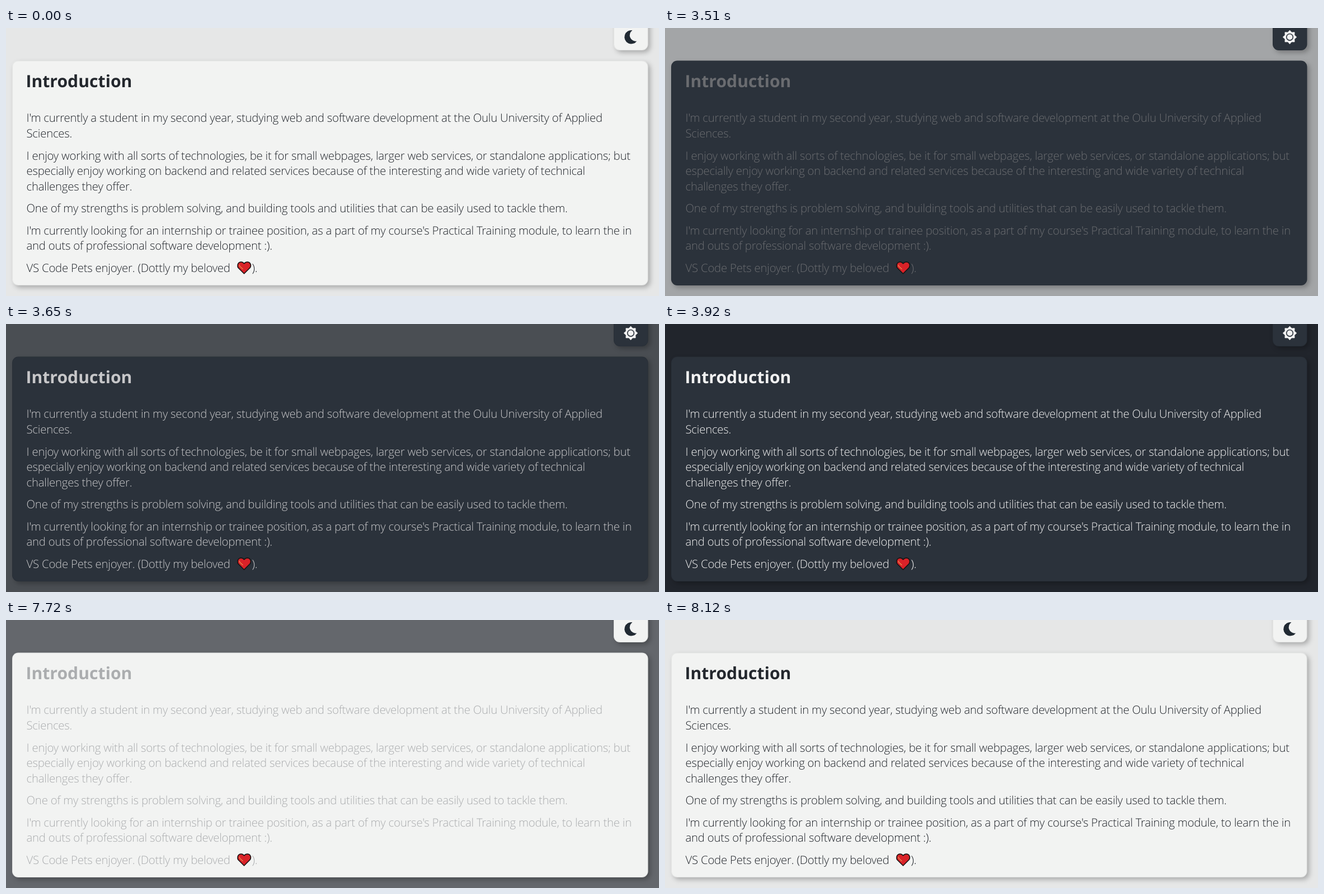
Recreate the animation shown at these times as an HTML page. Size 1167 px wide and 480 px high, loop 8.26 s.

```html
<!DOCTYPE html>
<html lang="en">
<head>
<meta charset="utf-8">
<title>Theme switch</title>
<style>
  html, body { margin: 0; width: 100%; height: 100%; overflow: hidden; }
  svg { display: block; }
  .panel { filter: drop-shadow(4px 4px 4px rgba(0, 0, 0, .26)); }
  .edge { fill: none; stroke: rgba(0, 0, 0, .06); }
  text {
    font: 300 20.4px "Open Sans", "Noto Sans", sans-serif;
    letter-spacing: -.24px;
    text-rendering: geometricPrecision;
    white-space: pre;
  }
  .title { font-size: 30.2px; font-weight: 700; letter-spacing: 0; }
</style>
</head>
<body>
<svg width="1167" height="480" viewBox="0 0 1167 480">
  <g id="panels">
    <rect class="panel" x="1086" y="-20" width="61.5" height="60" rx="11"/>
    <rect class="panel" x="11" y="58.5" width="1136.5" height="402.5" rx="11"/>
  </g>
  <rect class="edge" x="1086.5" y="-20" width="60.5" height="59.5" rx="10.5"/>
  <rect class="edge" x="11.5" y="59" width="1135.5" height="401.5" rx="10.5"/>

  <path id="moon" fill="#212a33" d="M1119.4 4.2A12.2 12.2 0 1 0 1127.4 23.4A10.6 10.6 0 0 1 1119.4 4.2Z"/>
  <g id="sun" fill="#f2f2f2">
    <polygon id="rays" stroke="#f2f2f2" stroke-width="1.4" stroke-linejoin="round"/>
    <circle cx="1116.5" cy="16.3" r="5.8" stroke="#2b323b" stroke-width="1.6"/>
  </g>

  <g id="copy"><text class="title" x="35.4" y="106">Introduction</text></g>

  <path fill="#d92228" stroke="#171313" stroke-width="1.6" stroke-linejoin="round"
    d="M425.5 440L415 429.5Q413.6 427.5 414 424.5Q415 419.3 420 419Q423.5 419 425.5 422Q428 419 431.5 419Q436.6 419.5 437.4 424.5Q437.6 427.5 436 429.5Z"/>
  <path fill="none" stroke="#e5904f" stroke-width="1.2" d="M417.5 424V426.5L423.5 432"/>
</svg>
<script>
const $ = id => document.getElementById(id);
const LOOP = 8260, DURATION = 500, TO_DARK = 3450, TO_LIGHT = 7650;
const LIGHT = { page: [230, 231, 231], text: [35, 39, 45], panel: '#f2f3f2' };
const DARK = { page: [33, 37, 44], text: [242, 242, 242], panel: '#2b323b' };

const paragraphs = [
  ["I'm currently a student in my second year, studying web and software development at the Oulu University of Applied",
   'Sciences.'],
  ['I enjoy working with all sorts of technologies, be it for small webpages, larger web services, or standalone applications; but',
   'especially enjoy working on backend and related services because of the interesting and wide variety of technical',
   'challenges they offer.'],
  ['One of my strengths is problem solving, and building tools and utilities that can be easily used to tackle them.'],
  ["I'm currently looking for an internship or trainee position, as a part of my course's Practical Training module, to learn the in",
   'and outs of professional software development :).'],
  ['VS Code Pets enjoyer. (Dottly my beloved']
];

function addText(x, y, content) {
  const el = document.createElementNS('http://www.w3.org/2000/svg', 'text');
  el.setAttribute('x', x);
  el.setAttribute('y', Math.round(y));
  el.textContent = content;
  $('copy').append(el);
}

let y = 168.3;
for (const lines of paragraphs) {
  for (const line of lines) {
    addText(36.5, y, line);
    y += 27.5;
  }
  y += 12.2;
}
addText(439.5, 437, ').');

$('rays').setAttribute('points', Array.from({ length: 16 }, (_, i) => {
  const angle = i * Math.PI / 8, r = i % 2 ? 8.7 : 11.7;
  return [1116.5 + r * Math.cos(angle), 16.3 + r * Math.sin(angle)].map(v => v.toFixed(2));
}).join(' '));

// The CSS "ease" curve: cubic-bezier(.25, .1, .25, 1)
function ease(x) {
  if (x >= 1) return 1;
  const bezier = (a, b, s) => 3 * a * s * (1 - s) ** 2 + 3 * b * s * s * (1 - s) + s ** 3;
  let lo = 0, hi = 1;
  for (let i = 0; i < 24; i++) {
    const mid = (lo + hi) / 2;
    if (bezier(.25, .25, mid) < x) lo = mid; else hi = mid;
  }
  return bezier(.1, 1, lo);
}

// The fade advances in eight visible steps.
function progress(elapsed) {
  const step = Math.min(7, Math.floor((elapsed + 7) / 67));
  return ease((43 + step * 67) / DURATION);
}

const mix = (a, b, p) => `rgb(${a.map((v, i) => Math.round(v + (b[i] - v) * p))})`;

function draw() {
  const t = performance.now() % LOOP;
  const dark = t >= TO_DARK && t < TO_LIGHT;
  const [from, to] = dark ? [LIGHT, DARK] : [DARK, LIGHT];
  const p = t < TO_DARK ? 1 : progress(t - (dark ? TO_DARK : TO_LIGHT));

  document.body.style.background = mix(from.page, to.page, p);
  $('copy').setAttribute('fill', mix(from.text, to.text, p));
  $('panels').setAttribute('fill', to.panel);
  $('moon').style.display = dark ? 'none' : '';
  $('sun').style.display = dark ? '' : 'none';
  requestAnimationFrame(draw);
}
draw();
</script>
</body>
</html>
```
